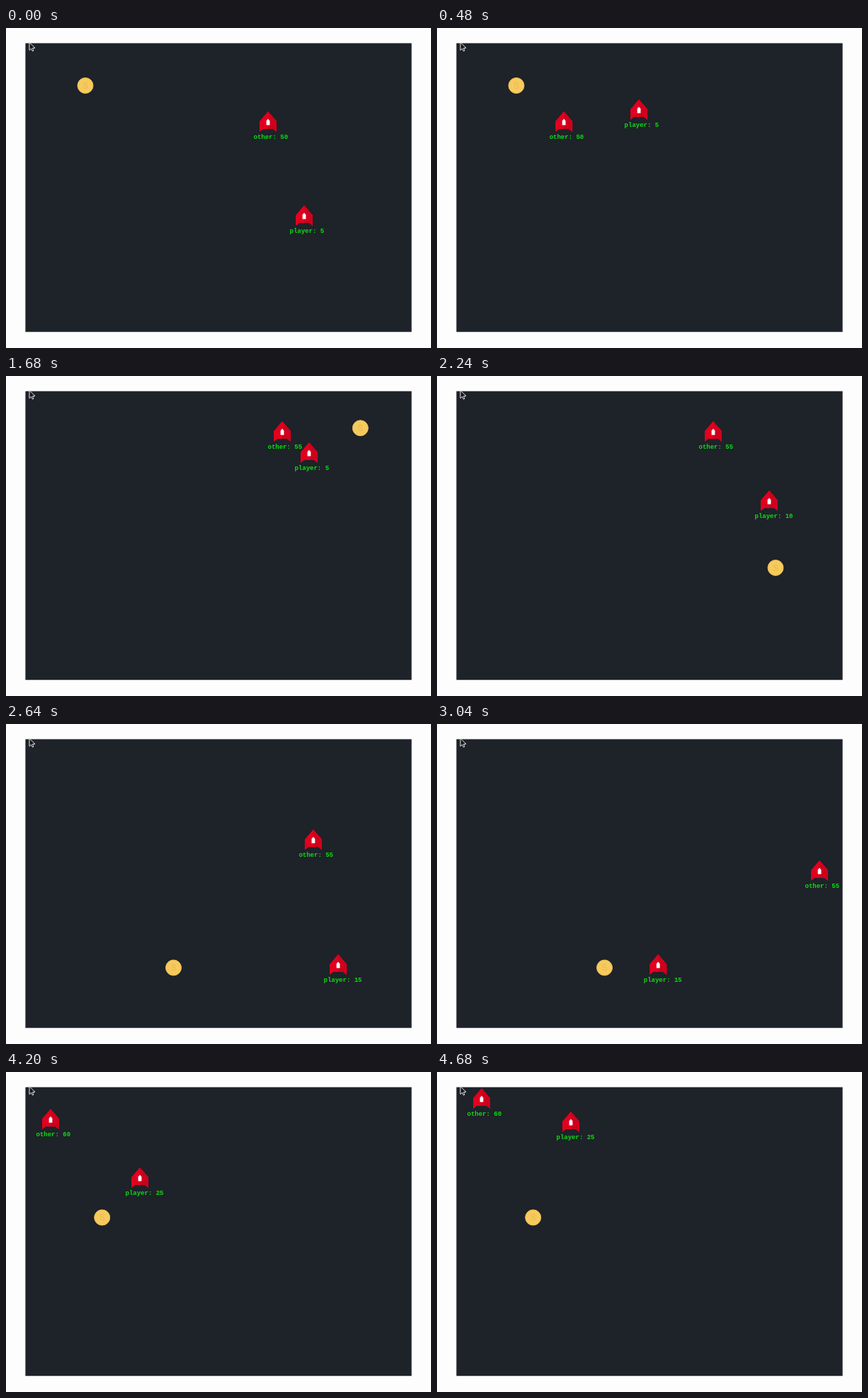
Write an HTML page with a canvas that moves like this. It is 600x453 px and loops after 4720 ms.

```html
<!DOCTYPE html>
<html>
<head>
<meta charset="utf-8">
<style>
  html, body { margin: 0; height: 100%; overflow: hidden; background: #fdfdfe; }
  canvas { display: block; }
</style>
</head>
<body>
<canvas id="stage" width="600" height="453"></canvas>
<script>
const ctx = document.getElementById('stage').getContext('2d');
const LOOP = 4720, STEP = 40;
const SPEED = 0.426; // pixels per ms on each axis
const COIN = 11, WING = 12, HEIGHT = 29;

// A ship starts at "from"; each move [time, goal] heads for its goal at SPEED.
const other = {
  name: 'other', score: 50,
  x: { from: 370, moves: [[32, 47], [827, 172], [1150, 390], [2537, 540], [3047, 63]] },
  y: { from: 118, moves: [[590, 57], [1400, 64], [2440, 193], [3200, 227], [3790, 23]] }
};
const player = {
  name: 'player', score: 5,
  x: { from: 421, moves: [[161, 203], [1152, 536], [1990, 469], [2672, 223], [3400, 291], [3730, 189]] },
  y: { from: 251, moves: [[128, 94], [1740, 38], [1949, 326], [3217, 135], [4490, 56]] }
};
const ships = [other, player];

// The next coin appears when a ship touches the current one.
const coins = [[112, 81.5], [500.3, 73.7], [478, 271.5], [236.5, 345], [290, 225], [58, 41.5], [135.7, 206]];

function position({ from, moves }, t) {
  let at = from;
  moves.forEach(([start, goal], i) => {
    const end = i + 1 < moves.length ? Math.min(t, moves[i + 1][0]) : t;
    const reach = SPEED * Math.max(0, end - start);
    at += Math.max(-reach, Math.min(reach, goal - at));
  });
  return at;
}

function touches(ship, [cx, cy], t) {
  const x = position(ship.x, t), y = position(ship.y, t);
  return Math.abs(x - cx) < WING + COIN && y < cy + COIN && y + HEIGHT > cy - COIN;
}

function play(t) {
  const scores = ships.map(ship => ship.score);
  let coin = 0;
  for (let now = 0; now <= t; now += STEP) {
    const winner = ships.findIndex(ship => touches(ship, coins[coin], now));
    if (winner >= 0 && coin < coins.length - 1) {
      scores[winner] += 5;
      coin++;
    }
  }
  return { scores, coin: coins[coin] };
}

function trace(points) {
  ctx.beginPath();
  points.forEach(([x, y]) => ctx.lineTo(x, y));
  ctx.closePath();
}

function polygon(color, points) {
  trace(points);
  ctx.fillStyle = color;
  ctx.fill();
}

function drawCoin([x, y]) {
  ctx.beginPath();
  ctx.arc(x, y, COIN, 0, Math.PI * 2);
  ctx.fillStyle = '#f6ca5c';
  ctx.fill();
  ctx.strokeStyle = '#e9bc54';
  ctx.lineWidth = 1;
  ctx.stroke();
  ctx.fillStyle = '#e8b950';
  ctx.font = '12px "Liberation Sans", sans-serif';
  ctx.textAlign = 'center';
  ctx.fillText('S', x, y + 4.3);
}

function drawShip(ship, score, t) {
  ctx.save();
  ctx.translate(position(ship.x, t), position(ship.y, t));
  polygon('#e2001e', [[0, 0], [WING, 14], [WING, HEIGHT], [7, 25], [-7, 25], [-WING, HEIGHT], [-WING, 14]]);
  polygon('#cf001c', [[0, 0], [WING, 14], [WING, HEIGHT], [7, 25], [0, 25]]);
  polygon('#fff', [[0, 10.5], [2.4, 13.5], [2.4, 19.5], [-2.4, 19.5], [-2.4, 13.5]]);
  ctx.fillStyle = '#0fdc14';
  ctx.font = 'bold 9px "Liberation Mono", monospace';
  ctx.textAlign = 'left';
  ctx.fillText(`${ship.name}: ${score}`, -20.5, 39);
  ctx.restore();
}

function drawCursor() {
  ctx.save();
  ctx.translate(33, 20.5);
  trace([[0, 0], [0, 11], [2.6, 8.7], [4.4, 12.3], [6, 11.5], [4.5, 8], [8, 7.8]]);
  ctx.fillStyle = '#15171b';
  ctx.fill();
  ctx.strokeStyle = '#e8e8ea';
  ctx.lineWidth = 1;
  ctx.stroke();
  ctx.restore();
}

function draw(t) {
  const { scores, coin } = play(t);
  ctx.fillStyle = '#fdfdfe';
  ctx.fillRect(0, 0, 600, 453);
  ctx.save();
  ctx.beginPath();
  ctx.rect(27.4, 21.4, 545.2, 408.8);
  ctx.fillStyle = '#1e2229';
  ctx.fill();
  ctx.clip();
  drawCoin(coin);
  ships.forEach((ship, i) => drawShip(ship, scores[i], t));
  ctx.restore();
  drawCursor();
}

const start = performance.now();
function tick() {
  const t = (performance.now() - start) % LOOP;
  draw(Math.floor(t / STEP) * STEP);
  requestAnimationFrame(tick);
}
tick();
</script>
</body>
</html>
```
